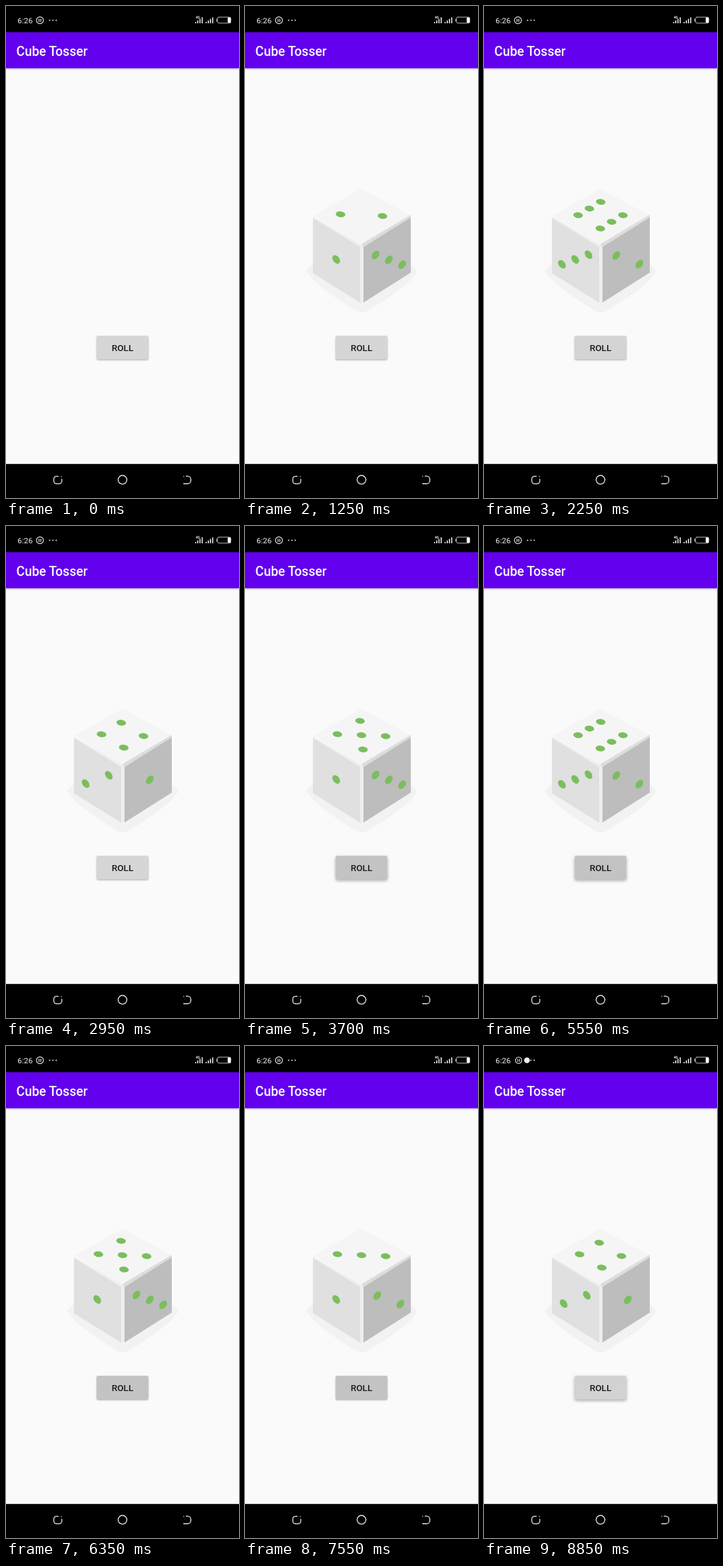
These frames come from a looping animation (350x740 px, 8.9 s). An HTML page:

```html
<!DOCTYPE html>
<html lang="en">
<head>
<meta charset="utf-8">
<title>Cube Tosser</title>
<style>
  html, body { margin: 0; width: 100%; height: 100%; overflow: hidden; background: #fafafa; }
  svg { display: block; width: 350px; height: 740px; }
  text { font-family: Roboto, sans-serif; }
  .line { fill: none; stroke: #eee; stroke-width: 1.2; stroke-linecap: round; }
  #appbar { filter: drop-shadow(0 1.2px 1.4px rgba(0, 0, 0, .3)); }
</style>
</head>
<body>
<svg viewBox="0 0 350 740">
  <defs>
    <clipPath id="buttonArea"><rect x="131" y="490" width="87" height="47"/></clipPath>
  </defs>
  <rect id="appbar" y="39" width="350" height="54.6" fill="#6200ee"/>
  <text x="15.5" y="74.5" font-size="19.4" font-weight="500" fill="#fff">Cube Tosser</text>

  <rect width="350" height="39.4" fill="#000"/>
  <text x="17.3" y="26" font-size="11.8" fill="#f2f2f2">6:26</text>
  <g id="pause" class="line">
    <circle cx="51" cy="21.5" r="5.2"/>
    <path d="M49.6 19.6v3.8M52.4 19.6v3.8"/>
  </g>
  <circle id="notice" cx="64.5" cy="21.5" r="4.3" fill="#eee"/>
  <g id="dots" fill="#eee"></g>
  <g id="signal" fill="#eee"></g>
  <text x="285" y="18.8" font-size="5" font-weight="700" fill="#eee">4G</text>
  <rect x="317.7" y="16.8" width="20" height="9" rx="2.2" class="line" style="stroke:#bbb;stroke-width:1"/>
  <path d="M316.6 19.8v3" class="line" style="stroke:#bbb"/>
  <rect x="333" y="17.3" width="4.5" height="8" rx="1" fill="#fff"/>

  <g id="die">
    <path d="M102 388L93 396Q91 399 94 402Q108 422 164 457Q175 465 186 457Q242 424 257 402Q259 399 257 396L249 388Z" fill="#f2f2f2"/>
    <path d="M102 317L175 359L249 317V401L177 446H173L102 402Z" fill="#eee"/>
    <path d="M175 275L249 315L175 359L102 315.5Z" fill="#f5f5f5"/>
    <path d="M175 358L249 314V318L177.5 363Z" fill="#dcdcdc"/>
    <path d="M102 319L173 362.5V446L102 402Z" fill="#e0e0e0"/>
    <path d="M178 362.5L249 318V401L178 446Z" fill="#bdbdbd"/>
    <g id="pips" fill="#7abe5e"></g>
  </g>

  <g clip-path="url(#buttonArea)">
    <rect id="button" x="136.3" y="496" width="77.4" height="35.5" rx="2"/>
  </g>
  <text x="175" y="519" font-size="13.6" font-weight="500" fill="#1a1a1a" text-anchor="middle">ROLL</text>

  <rect y="688.8" width="350" height="52" fill="#000"/>
  <g class="line" style="stroke-width:1.3">
    <path d="M78.5 707.3H76a4.2 4.2 0 0 0-4.2 4.2v3a4.2 4.2 0 0 0 4.2 4.2h3.6a4.2 4.2 0 0 0 4.2-4.2v-2.8M83 707.6h.2"/>
    <circle cx="175" cy="712.6" r="6.6"/>
    <path d="M270.5 707.2h2.5a4.6 4.6 0 0 1 4.6 4.6v2.1a4.6 4.6 0 0 1-4.6 4.6h-6.2M266.9 707.4h.2"/>
  </g>
</svg>
<script>
const LOOP = 8900;
const RELEASE = 130;     // finger lifts this long after touching down
const TAP_GAP = 575;     // usual time between touches
const NOTICE_AT = 8800;
const ROLLS = [2, 3, 6, 4, 5];

const $ = id => document.getElementById(id);
const clamp = x => Math.max(0, Math.min(1, x));
const mix = (a, b, k) => a + (b - a) * k;
const times = (n, f) => Array.from({ length: n }, (_, i) => f(i));

// Touches follow a steady rhythm between a few fixed moments.
const beats = [750, 3600, 4750, 6150, 7350, 8800];
const touches = beats.flatMap((from, i) => {
  const gap = (beats[i + 1] ?? LOOP) - from;
  const count = Math.max(1, Math.round(gap / TAP_GAP));
  return times(count, k => from + gap * k / count);
});

// Positions of n pips in a row, from -1 to 1; pairs stand a little closer.
const row = n => n === 1 ? [0] : n === 2 ? [-.87, .87] : [-1, 0, 1];
const diagonal = n => row(n).map(s => [s, s]);

function topLayout(n) {
  if (n < 4) return diagonal(n);
  const along = row(n === 4 ? 2 : 3);
  const across = row(n === 5 ? 3 : 2);
  return along.flatMap(a => across.map(b => [a, b]))
    .filter(([a, b]) => n !== 5 || Math.abs(a) === Math.abs(b));
}

// Each face has a centre, two axes in screen space and a pip shape.
const faces = {
  top: { x: 175, y: 314.6, a: [17, -10], b: [19.2, 11.5], rx: 7.2, ry: 4.4, tilt: 7 },
  left: { x: 137, y: 381.2, a: [10, 5.9], b: [10, -13.1], rx: 7.2, ry: 4.8, tilt: 53 },
  right: { x: 216, y: 381.8, a: [10, -5.9], b: [10, 13.3], rx: 7.2, ry: 4.8, tilt: -53 }
};

const drawPips = ({ x, y, a, b, rx, ry, tilt }, layout) => layout.map(([p, q]) => {
  const px = x + p * a[0] + q * b[0], py = y + p * a[1] + q * b[1];
  return `<ellipse rx="${rx}" ry="${ry}" transform="translate(${px} ${py}) rotate(${tilt})"/>`;
}).join('');

function showValue(value) {
  $('die').style.display = value ? '' : 'none';
  if (!value) return;
  const left = value % 2 ? 1 : value / 2;
  const right = 1 + (2 * value + 1) % 3;
  $('pips').innerHTML = drawPips(faces.top, topLayout(value)) +
    drawPips(faces.left, diagonal(left)) + drawPips(faces.right, diagonal(right));
}

function showNotice(on) {
  $('notice').style.display = on ? '' : 'none';
  $('pause').setAttribute('transform', on ? 'translate(6.1 2.1) scale(.9)' : '');
  $('dots').innerHTML = times(on ? 2 : 3, i =>
    `<circle cx="${(on ? 70.5 : 65.5) + 5 * i}" cy="21.5" r="1"/>`).join('');
}

function drawSignal() {
  const bars = x => times(4, i => {
    const height = 2 + 2.3 * i;
    return `<rect x="${x + i * 3.3}" y="${26 - height}" width="1.6" height="${height}"/>`;
  }).join('');
  $('signal').innerHTML = bars(284) + bars(299.8);
}

function drawButton(age) {
  const ripple = clamp((age - 40) / 50) * (1 - clamp((age - 225) / 150));
  const lift = clamp(age / 50) * (1 - clamp((age - RELEASE) / 60));
  const gray = Math.round(mix(214, 195, ripple));
  $('button').style.fill = `rgb(${gray},${gray},${gray})`;
  $('button').style.filter =
    `drop-shadow(0 ${mix(1, 2.4, lift)}px ${mix(1, 2.6, lift)}px rgba(0,0,0,.32))`;
}

let shownValue, shownNotice;
function draw(now) {
  const t = now % LOOP;
  const lastTouch = touches.filter(at => at <= t).pop() ?? -Infinity;
  const rolled = touches.filter(at => at + RELEASE <= t).length;
  const value = rolled ? ROLLS[(rolled - 1) % ROLLS.length] : 0;
  const notice = t >= NOTICE_AT;
  if (value !== shownValue) showValue(shownValue = value);
  if (notice !== shownNotice) showNotice(shownNotice = notice);
  drawButton(t - lastTouch);
}

drawSignal();
const start = performance.now();
function tick() {
  draw(performance.now() - start);
  requestAnimationFrame(tick);
}
tick();
</script>
</body>
</html>
```
